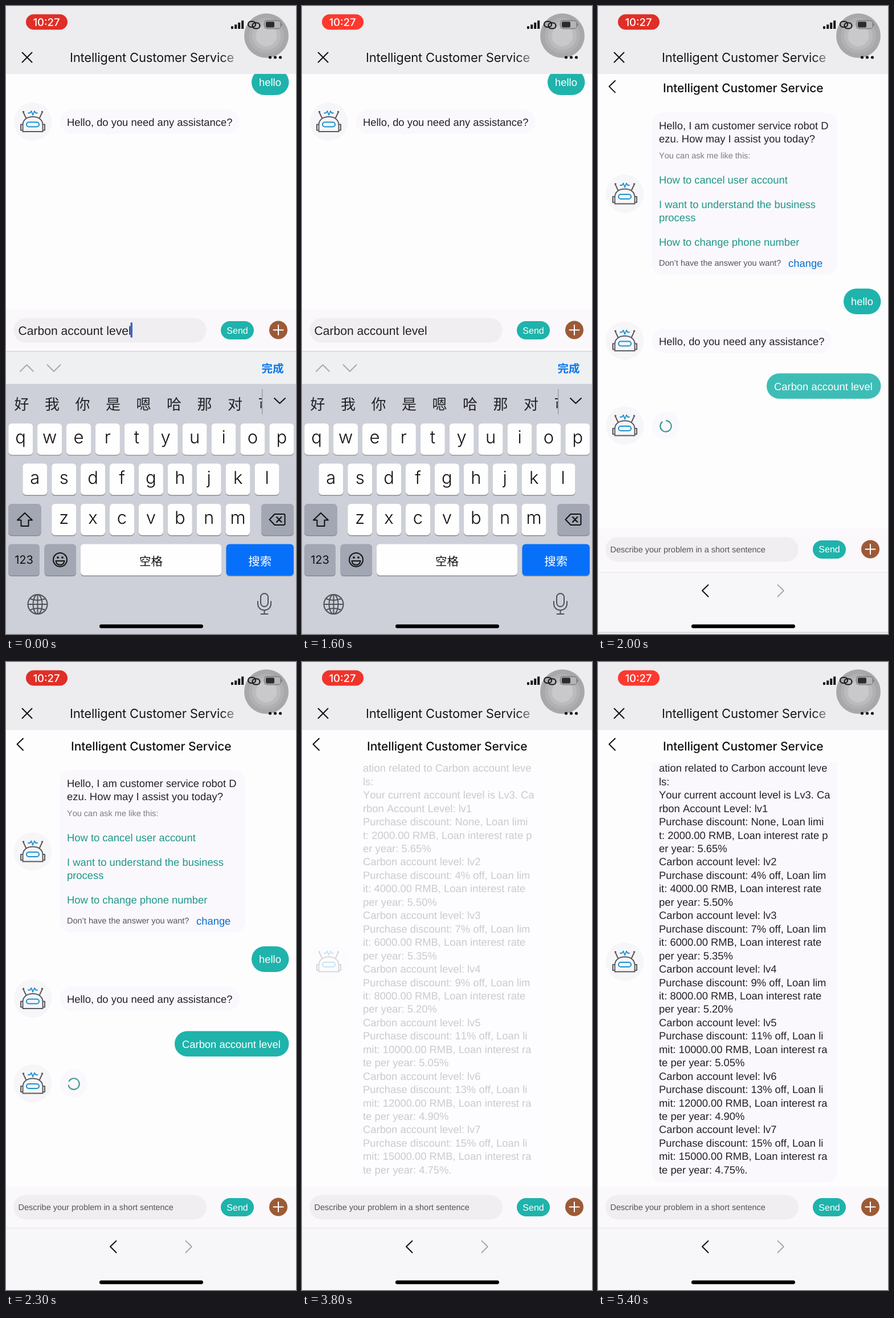
An HTML page for the animation above (5.5 s loop, 509 by 1100 pixels).

```html
<!DOCTYPE html>
<html lang="zh-CN">
<head>
<meta charset="utf-8">
<title>Chat</title>
<style>
  html, body { margin: 0; width: 100%; height: 100%; overflow: hidden; background: #fefdfe; }
  svg { display: block; }
  text { font: 18.4px "Liberation Sans", Arial, sans-serif; font-kerning: none;
    text-rendering: geometricPrecision; fill: #222126; }
  .ui { font-family: Inter, sans-serif; font-kerning: normal; }
  .cjk { font-family: "Noto Sans CJK SC", "Noto Sans CJK", sans-serif; }
  .mid { text-anchor: middle; }
  .small { font-size: 14.5px; fill: #55535a; }
  .link { fill: #1f968a; }
  .white { fill: #fff; }
  .line { fill: none; stroke: #111; stroke-width: 2; stroke-linecap: round; stroke-linejoin: round; }
  .teal { fill: #1fb3ab; }
  .bubble { fill: #faf8fc; }
  .letter { font-weight: 300; }
  .bartitle { font-size: 22px; letter-spacing: -.19px; fill: #161618;
    -webkit-mask-image: linear-gradient(90deg, #000 265px, transparent 305px);
    mask-image: linear-gradient(90deg, #000 265px, transparent 305px); }

  .page, .keyboard, .sent, .answer, .chat, .wait, .typed, .caret, .pill {
    animation: 5.5s linear infinite; }
  .page, .keyboard {
    animation-timing-function: cubic-bezier(.2, .7, .3, 1);
    animation-timing-function: linear(0, .232, .545, .758, .879, .942, .973, .988, .994, .998, 1); }
  .page { animation-name: lower; }
  .keyboard { animation-name: dismiss; }
  .sent { animation-name: sent; animation-timing-function: ease; }
  .answer { animation-name: answer; animation-timing-function: ease; }
  .chat, .wait, .typed { animation-timing-function: step-end; }
  .chat { animation-name: chat; }
  .wait { animation-name: wait; }
  .typed { animation-name: typed; }
  .caret { animation-name: blink; }
  .pill { animation-name: pulse; }
  .spin { animation: spin calc(5.5s / 15) linear infinite; }

  @keyframes lower {
    0%, 29.4% { transform: translateY(-387px); }
    38.5%, 100% { transform: translateY(0); }
  }
  @keyframes dismiss {
    0%, 29.4% { transform: translateY(0); }
    38.5%, 100% { transform: translateY(496px); }
  }
  @keyframes sent { 0%, 29.64% { opacity: 0; } 41.45%, 100% { opacity: 1; } }
  @keyframes answer { 0%, 67.09% { opacity: 0; } 78.9%, 100% { opacity: 1; } }
  @keyframes chat { 0% { opacity: 1; } 67.09%, 100% { opacity: 0; } }
  @keyframes wait { 0% { opacity: 0; } 29.5%, 100% { opacity: 1; } }
  @keyframes typed { 0% { opacity: 1; } 29.5%, 100% { opacity: 0; } }
  @keyframes blink {
    0%, 8.5%, 19%, 26% { opacity: 1; }
    10.5%, 17%, 28%, 100% { opacity: 0; }
  }
  @keyframes pulse {
    0%, 10.9%, 36.4%, 47.3%, 72.7%, 83.6% { fill: #df2f27; }
    23.6%, 29.5%, 60%, 65.8%, 96.4%, 100% { fill: #fd382e; }
  }
  @keyframes spin { from { transform: rotate(106deg); } to { transform: rotate(466deg); } }
</style>
</head>
<body>
<svg width="509" height="1100" viewBox="0 0 509 1100">
  <defs>
    <g id="bot">
      <circle r="33.5" fill="#f6f5f8"/>
      <g class="line" style="stroke:#5b5a5f">
        <path d="M-17.5 17.5V6C-17.5 -4 -9 -8.5 0 -8.5S17.5 -4 17.5 6V17.5ZM-17.5 5h-3.5v10h3.5M17.5 5h3.5v10h-3.5M-12 -6.5L-16 -15M12 -6.5L16 -15"/>
        <circle cx="-16.5" cy="-17" r=".8"/>
        <circle cx="16.5" cy="-17" r=".8"/>
      </g>
      <g class="line" style="stroke:#1a92cf">
        <rect x="-11" y="1" width="22" height="8" rx="4"/>
        <path stroke-width="1.8" d="M-8 -15h3l2.500 -3.500 2.500 7 3 -7 2 3.500h3"/>
      </g>
    </g>
    <clipPath id="strip"><path d="M0 662h449v69H0z"/></clipPath>
  </defs>
  <rect width="509" height="1100" fill="#fefdfe"/>

  <g class="page">
    <g class="chat">
      <rect class="bubble" x="94" y="189" width="326" height="285" rx="20"/>
      <use href="#bot" x="47" y="332"/>
      <text x="107" y="218.500">Hello, I am customer service robot D</text>
      <text x="107" y="242">ezu. How may I assist you today?</text>
      <text x="107" y="270" class="small" style="fill:#7d7b82">You can ask me like this:</text>
      <text x="107" y="313.500" class="link">How to cancel user account</text>
      <text x="107" y="356.500" class="link">I want to understand the business</text>
      <text x="107" y="380" class="link">process</text>
      <text x="107" y="423" class="link">How to change phone number</text>
      <text x="107" y="457.500" class="small">Don’t have the answer you want?</text>
      <text x="334" y="459.500" style="fill:#0a6bcb">change</text>

      <rect class="teal" x="431" y="498" width="65.500" height="45" rx="22.500"/>
      <text x="444" y="526.500" class="white">hello</text>

      <use href="#bot" x="47" y="589.500"/>
      <rect class="bubble" x="94" y="568" width="316" height="43" rx="21.500"/>
      <text x="107" y="596.500">Hello, do you need any assistance?</text>

      <g class="sent">
        <rect class="teal" x="296" y="646.500" width="200.500" height="44.500" rx="22"/>
        <text x="309" y="675.500" class="white">Carbon account level</text>
      </g>
      <g class="wait">
        <use href="#bot" x="47" y="738"/>
        <circle class="bubble" cx="119" cy="738" r="24.500"/>
        <g transform="translate(119 739)">
          <circle class="line spin" r="9.700" pathLength="100" stroke-dasharray="90 10" style="stroke:#2f8f86;stroke-linecap:butt"/>
        </g>
      </g>
    </g>

    <g class="answer">
      <rect class="bubble" x="94" y="138" width="326" height="774" rx="20"/>
      <use href="#bot" x="47" y="525"/>
      <g id="reply"></g>
    </g>

    <rect y="119" width="509" height="57" fill="#fefdfe"/>
    <path class="line" d="M30 134l-10.500 10 10.500 10.500"/>
    <text x="114" y="154.500" class="ui" style="font-size:21px;font-weight:500;letter-spacing:-.09px;fill:#111">Intelligent Customer Service</text>

    <rect y="918" width="509" height="74" fill="#faf8fb"/>
    <rect x="13" y="933.500" width="339" height="43" rx="21.500" fill="#f0eef1"/>
    <g class="typed">
      <text x="21.500" y="963" style="font-size:21.100px">Carbon account level</text>
      <rect class="caret" x="218.500" y="941" width="3.500" height="27" rx="1.700" fill="#3b62d3"/>
    </g>
    <text x="21.500" y="960" class="small wait">Describe your problem in a short sentence</text>
    <rect class="teal" x="377" y="939" width="58" height="32" rx="16"/>
    <text x="406" y="960.500" class="white mid" style="font-size:16px">Send</text>
    <circle cx="478" cy="954.500" r="16" fill="#9c5a37"/>
    <path class="line" style="stroke:#fff" d="M469.500 954.500h17M478 946v17"/>
  </g>

  <rect y="991" width="509" height="109" fill="#f7f6f9"/>
  <path stroke="#e6e5e8" d="M0 991.500h509"/>
  <path class="line" d="M193.500 1014l-10.500 10 10.500 10.500"/>
  <path class="line" style="stroke:#a9a8ac" d="M315.500 1014l10.500 10-10.500 10.500"/>

  <g class="keyboard">
    <rect y="605" width="509" height="58" fill="#eff0f2"/>
    <path stroke="#c6c6ca" d="M0 605h509"/>
    <path class="line" style="stroke:#a9abaf" d="M25 640l11.500 -11.500 11.500 11.500M72.500 628.500l11.500 11.500 11.500 -11.500"/>
    <text x="468" y="642" class="cjk mid" style="font-size:19.500px;font-weight:700;fill:#0b78ea">完成</text>
    <rect y="662" width="509" height="438" fill="#cdd0d8"/>
    <g class="typed">
      <g id="words" clip-path="url(#strip)"></g>
      <path stroke="#9b9da3" stroke-width="1.500" d="M449.700 671v44"/>
      <path class="line" d="M471 687l9.500 9 9.500 -9"/>
    </g>
    <g id="keys"></g>
    <path class="line" d="M33 888l13 12.500h-6.500v10.500h-13v-10.500H20z"/>
    <path class="line" d="M462.500 899.500l9 -9.500h16q2 0 2 2v15q0 2 -2 2h-16zM475 895l8.500 9M483.500 895l-8.500 9"/>
    <circle class="line" cx="95" cy="970" r="12"/>
    <path d="M87.500 972h15q-1 7 -7.500 7t-7.500 -7z" fill="none" stroke="#111" stroke-width="1.800"/>
    <circle cx="91" cy="966" r="1.800"/>
    <circle cx="99" cy="966" r="1.800"/>
    <g class="line" style="stroke:#505258">
      <circle cx="55.500" cy="1048" r="17"/>
      <ellipse cx="55.500" cy="1048" rx="8" ry="17"/>
      <path d="M38.500 1048h34M55.500 1031v34M42 1038q13.500 6 27 0M42 1058q13.500 -6 27 0"/>
      <rect x="447" y="1029" width="13" height="23" rx="6.500"/>
      <path d="M442 1043v4c0 15 23 15 23 0v-4M453.500 1058.500v6M447.500 1065h12"/>
    </g>
  </g>

  <rect x="164" y="1083.200" width="182" height="6.500" rx="3.200"/>

  <rect width="509" height="119" fill="#edecee"/>
  <rect class="pill" x="35" y="14.500" width="73" height="27" rx="13.500"/>
  <text x="71" y="34.500" class="ui white mid" style="font-size:18.500px;font-weight:500">10:27</text>
  <path class="line" d="M28.500 81.500l17 17M45.500 81.500l-17 17"/>
  <text x="112" y="98" class="ui bartitle">Intelligent Customer Service</text>
  <circle cx="457" cy="52" r="39" fill="#a8a7a9"/>
  <circle cx="457" cy="52" r="31" fill="#b1b0b2"/>
  <circle cx="457" cy="52" r="25" fill="#bbbabc"/>
  <circle cx="457" cy="52" r="18.500" fill="#c9c8ca"/>
  <path d="M397 35.500v4.500M403.200 32.500v7.500M409.200 29v11M415.200 25.500v14.500" stroke="#111" stroke-width="4"/>
  <g class="line" style="stroke:#1a1a1c;stroke-width:2.200">
    <rect x="425" y="27" width="13" height="10" rx="5"/>
    <rect x="432.500" y="29.500" width="13" height="10" rx="5"/>
  </g>
  <rect x="453.500" y="25.500" width="28.500" height="14" rx="4" fill="#b5b4b6" stroke="#7c7b7d" stroke-width="1.300"/>
  <rect x="456" y="27.500" width="15" height="10" rx="2" fill="#2b2a2c"/>
  <path d="M484 30.500v4" stroke="#7c7b7d" stroke-width="2"/>
  <circle cx="463.500" cy="90" r="2.500"/>
  <circle cx="472.500" cy="90" r="2.500"/>
  <circle cx="481.500" cy="90" r="2.500"/>
</svg>
<script>
  const NS = 'http://www.w3.org/2000/svg';

  function add(parent, tag, attrs, label) {
    const node = document.createElementNS(NS, tag);
    for (const name in attrs) node.setAttribute(name, attrs[name]);
    if (label) node.textContent = label;
    document.getElementById(parent).append(node);
  }

  function key(x, y, width, fill, label, size, cls, drop, color = '#111') {
    const box = { x, width, height: 55, rx: 6 };
    add('keys', 'rect', { ...box, y: y + 1.4, fill: '#888a90' });
    add('keys', 'rect', { ...box, y, fill });
    if (label) add('keys', 'text', { x: x + width / 2, y: y + drop, class: cls + ' mid',
      style: `font-size:${size}px;fill:${color}` }, label);
  }

  const white = '#fefefe', gray = '#a2a7b3';
  [['qwertyuiop', 4.2], ['asdfghjkl', 29.3], ['zxcvbnm', 80.2]].forEach(([row, left], r) =>
    [...row].forEach((ch, i) =>
      key(left + i * 50.9, 731.2 + r * 70.4, 43, white, ch, 31, 'ui letter', 35)));
  key(4, 872, 57.5, gray);
  key(448, 872, 57, gray);
  key(4, 942.5, 55, gray, '123', 20, 'ui', 34.5);
  key(67.5, 942.5, 55.5, gray);
  key(131, 942.5, 247, white, '空格', 20.5, 'cjk', 37);
  key(386.5, 942.5, 118.5, '#0670fb', '搜索', 20.5, 'cjk', 37, '#fff');

  [...'好我你是嗯哈那对可'].forEach((ch, i) =>
    add('words', 'text', { x: 27.5 + i * 53.5, y: 706.5, class: 'cjk mid', style: 'font-size:26px' }, ch));

  const lines = ['ation related to Carbon account leve', 'ls:',
    'Your current account level is Lv3. Ca', 'rbon Account Level: lv1',
    'Purchase discount: None, Loan limi', 't: 2000.00 RMB, Loan interest rate p', 'er year: 5.65%'];
  [4, 7, 9, 11, 13, 15].forEach((off, i) => {
    const level = i + 2, limit = level === 7 ? 15000 : level * 2000;
    const rate = (5.65 - 0.15 * (i + 1)).toFixed(2);
    const [a, b, c, d] = level < 5 ? ['lim', 'it', 'rate', ''] : ['li', 'mit', 'ra', 'te '];
    lines.push(`Carbon account level: lv${level}`, `Purchase discount: ${off}% off, Loan ${a}`,
      `${b}: ${limit}.00 RMB, Loan interest ${c}`, `${d}per year: ${rate}%${level === 7 ? '.' : ''}`);
  });
  lines.forEach((line, i) => add('reply', 'text', { x: 107, y: 192.3 + i * 23.45 }, line));
</script>
</body>
</html>
```
